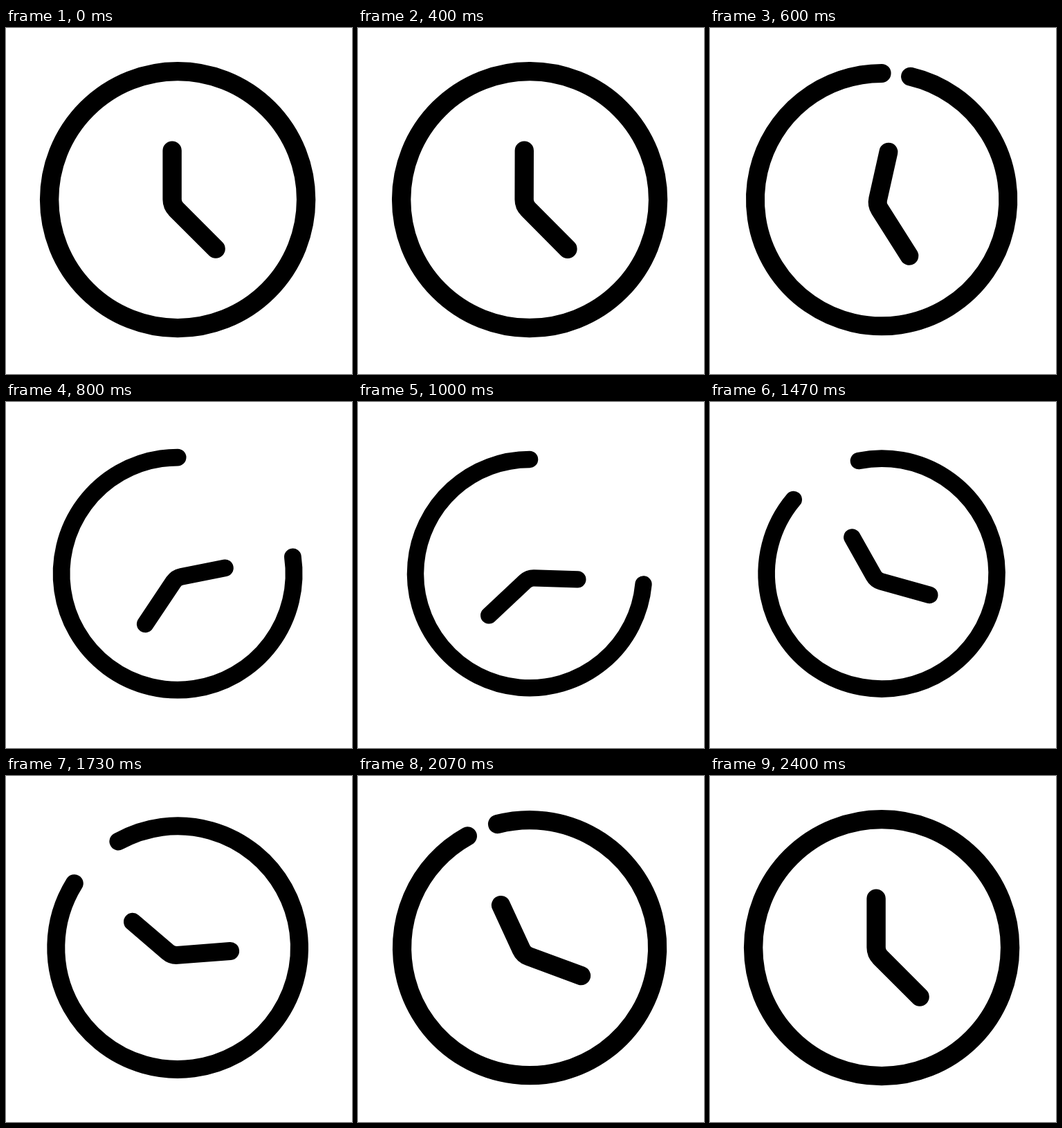
Recreate the animation shown at these times as an HTML page with a canvas. Size 500 by 500 pixels, loop 2.43 s.

```html
<!DOCTYPE html>
<html lang="en">
<head>
<meta charset="utf-8">
<title>Clock</title>
<style>
  html, body { margin: 0; height: 100%; overflow: hidden; background: #fff; }
  canvas { display: block; }
</style>
</head>
<body>
<canvas id="stage" width="500" height="500"></canvas>
<script>
const ctx = document.getElementById('stage').getContext('2d');
const LOOP = 2430;
const RAD = Math.PI / 180;
const PIVOT = [-4, 10.7];

// Tracks of [step, value]; angles in degrees, clockwise from the top
const TRACKS = {
  hands: [[10, 0], [29.1, 92], [48, -49.5], [68, 0]],
  gapEnd: [[10, 0], [29.1, 95.5], [48, -29.2], [68, 0]],
  gapStart: [[29.1, 0], [48, -58.2], [68, 0]],
  scale: [[10, 1], [29.1, 0.89], [30.6, 0.89], [67, 1]]
};

// cubic-bezier(.8, 0, .2, 1)
function ease(x) {
  let lo = 0, hi = 1;
  for (let i = 0; i < 30; i++) {
    const p = (lo + hi) / 2, q = 1 - p;
    if (2.4 * p * q * q + 0.6 * p * p * q + p ** 3 < x) lo = p;
    else hi = p;
  }
  return lo * lo * (3 - 2 * lo);
}

function valueAt(track, step) {
  if (step <= track[0][0]) return track[0][1];
  for (let i = 1; i < track.length; i++) {
    const [t0, v0] = track[i - 1], [t1, v1] = track[i];
    if (step < t1) return v0 + (v1 - v0) * ease((step - t0) / (t1 - t0));
  }
  return track[track.length - 1][1];
}

// 30 ticks a second, with the pose held on every 18th
function stepAt(ms) {
  const tick = Math.floor((ms + 3.4) * 0.03);
  return Math.floor(tick * 17 / 18);
}

function draw(ms) {
  const step = stepAt(ms);
  const at = name => valueAt(TRACKS[name], step);
  const scale = at('scale');

  ctx.setTransform(1, 0, 0, 1, 0, 0);
  ctx.fillStyle = '#fff';
  ctx.fillRect(0, 0, 500, 500);
  ctx.setTransform(scale, 0, 0, scale, 248.1, 248.1);
  ctx.strokeStyle = '#000';
  ctx.lineWidth = 27.4;
  ctx.lineCap = ctx.lineJoin = 'round';

  ctx.beginPath();
  ctx.arc(0, 0, 185.5, (at('gapEnd') - 90) * RAD, (at('gapStart') + 270) * RAD);
  ctx.stroke();

  ctx.translate(PIVOT[0], PIVOT[1]);
  ctx.rotate(at('hands') * RAD);
  ctx.translate(-PIVOT[0], -PIVOT[1]);
  ctx.beginPath();
  ctx.moveTo(-8, -71);
  ctx.arcTo(-8, 8, 55, 71, 20);
  ctx.lineTo(55, 71);
  ctx.stroke();
}

const start = performance.now();
function tick() {
  draw((performance.now() - start) % LOOP);
  requestAnimationFrame(tick);
}
tick();
</script>
</body>
</html>
```
